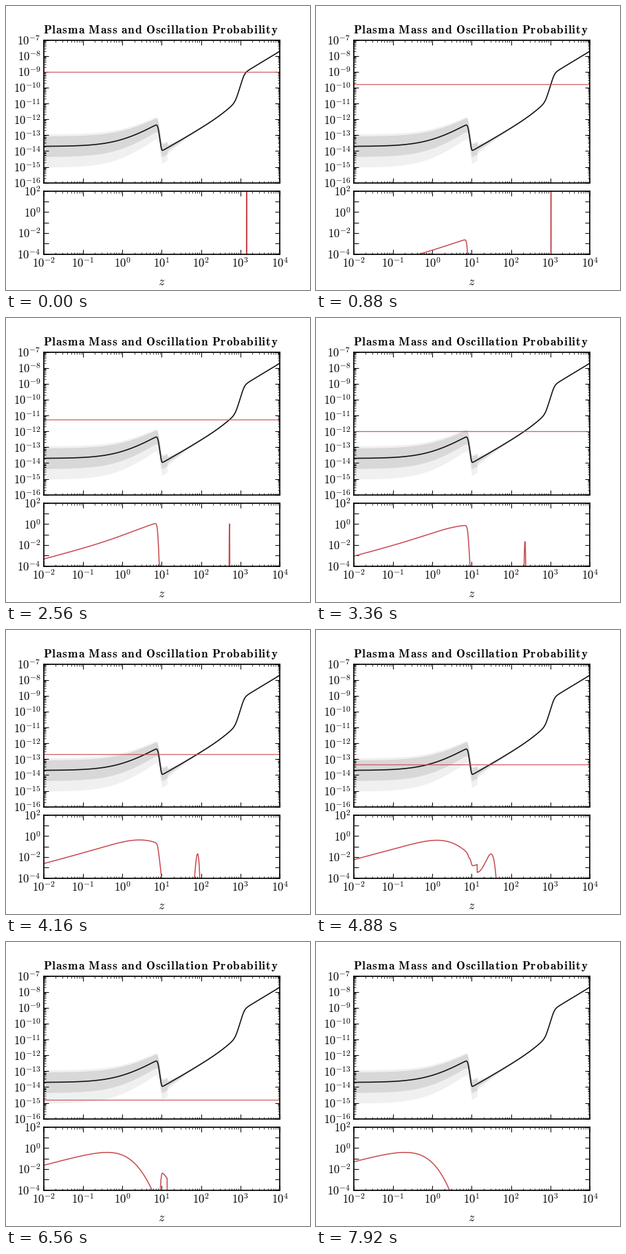
Animation, 442 px wide and 414 px high, one loop 8 s. Source, as a matplotlib script:

```python
import numpy as np
import matplotlib.pyplot as plt
from matplotlib.animation import FuncAnimation
from matplotlib.ticker import FuncFormatter, LogLocator, NullLocator

W, H, DPI = 442, 414, 128
PX = 72 / DPI  # points per pixel
FRAMES, INTERVAL = 100, 80
RED = "#c8484d"

plt.rcParams["mathtext.fontset"] = "cm"

# Redshift grid, denser where the resonance is narrow
lz = np.concatenate([np.linspace(-2, 2.4, 1500, endpoint=False),
                     np.linspace(2.4, 3.3, 4000, endpoint=False),
                     np.linspace(3.3, 4, 80)])
dlnz = np.gradient(lz) * np.log(10)
z = 10 ** lz
s = np.log1p(z)

# Ionised fraction: reionisation, recombination and the relic between them
Z_RE, DZ, RELIC = 7.8, 0.5, 2e-4
reion = 0.5 * (1 + np.tanh(((1 + Z_RE) ** 1.5 - (1 + z) ** 1.5)
                           / (1.5 * DZ * np.sqrt(1 + Z_RE))))
recomb = 1 / (1 + (1246 / z) ** 14)
relic = RELIC * (1 + (z / 415) ** 2) * (1 - recomb)
log_mp = -13.707 + 1.5 * np.log10(1 + z) + 0.5 * np.log10(reion + recomb + relic)
drop = -0.5 * np.log10(reion + RELIC)

# Scatter of the plasma mass in decades, much smaller before structure forms
spread = np.where(z < 13.7, 0.65 * (1 + z) ** -0.2, 2.5 / z)


def probability(log_m):
    """Conversion probability per log redshift for one particle mass."""
    share = 1 / (1 + 10 ** (-3.4 * (log_m + 10.56)))

    linear = 0.185 * abs(log_m + 11.5) ** 2.3 - 1
    square = 0.444 * np.log1p(np.exp(-(log_m + 11.7) / 0.6))
    cut = 2.8 * max(0, log_m + 14) ** 1.5
    late = z * np.exp(-linear * s - square * s ** 2 - cut * drop)
    late *= (1 - share) / np.sum(late * dlnz)

    height = 1.2 * share + 10 ** (-3.2 - 0.65 * (log_m + 12.68))
    t = (log_m - log_mp) / spread
    early = height * (1 - reion) / spread * np.exp(-t ** 2 / 2)
    return np.maximum(late + early, 1e-12)


def power_label(step):
    def label(v, _):
        n = round(np.log10(v))
        return rf"$10^{{{n}}}$" if n % step == 0 else ""
    return FuncFormatter(label)


def panel(fig, top, bottom, ylim, step):
    ax = fig.add_axes([55 / W, 1 - bottom / H, 343 / W, (bottom - top) / H])
    ax.set(xscale="log", yscale="log", xlim=(1e-2, 1e4), ylim=ylim)
    for axis, every in ((ax.xaxis, 1), (ax.yaxis, step)):
        axis.set_major_locator(LogLocator(numticks=20))
        axis.set_minor_locator(LogLocator(subs=np.arange(2, 10), numticks=20))
        axis.set_major_formatter(power_label(every))
        axis.set_minor_formatter(FuncFormatter(lambda v, _: ""))
    ax.tick_params(which="both", direction="in", top=True, right=True,
                   labelsize=16.7 * PX, pad=4.5 * PX)
    ax.tick_params(which="major", length=7 * PX, width=1.0 * PX)
    ax.tick_params(which="minor", length=3.4 * PX, width=0.75 * PX)
    for spine in ax.spines.values():
        spine.set_linewidth(1.7 * PX)
    return ax


def bold(text):
    """Bold roman text with slightly open letter spacing."""
    words = (r"\hspace{0.065}".join(word) for word in text.split())
    return r"$\mathbf{" + r"\hspace{0.41}".join(words) + "}$"


fig = plt.figure(figsize=(W / DPI, H / DPI), dpi=DPI, facecolor="white")
upper = panel(fig, 49.7, 257.7, (1e-16, 1e-7), 1)
lower = panel(fig, 269.7, 361.7, (1e-4, 1e2), 2)
upper.tick_params(labelbottom=False)
lower.yaxis.set_minor_locator(NullLocator())

fig.text(225 / W, 1 - 40 / H, bold("Plasma Mass and Oscillation Probability"),
         size=17.3 * PX, ha="center", va="baseline")
fig.text(226.5 / W, 1 - 407 / H, "$z$", size=18 * PX, ha="center", va="baseline")

for down, up, shade in ((2.03, 1.2, "#f0f0f0"), (1, 1, "#d8d8d8")):
    upper.fill_between(z, 10 ** (log_mp - down * spread), 10 ** (log_mp + up * spread),
                       color=shade, linewidth=0)
upper.plot(z, 10 ** log_mp, color="#111111", lw=1.6 * PX)
mass_line = upper.axhline(1e-9, color=RED, lw=1.3 * PX, alpha=0.85)
prob_line, = lower.plot(z, probability(-9), color=RED, lw=1.5 * PX)


def update(i):
    log_m = -9 - 7 * i / (FRAMES - 1)
    mass_line.set_ydata([10 ** log_m] * 2)
    prob_line.set_ydata(probability(log_m))
    return mass_line, prob_line


anim = FuncAnimation(fig, update, frames=FRAMES, interval=INTERVAL,
                     repeat=True, repeat_delay=0)
plt.show()
```
